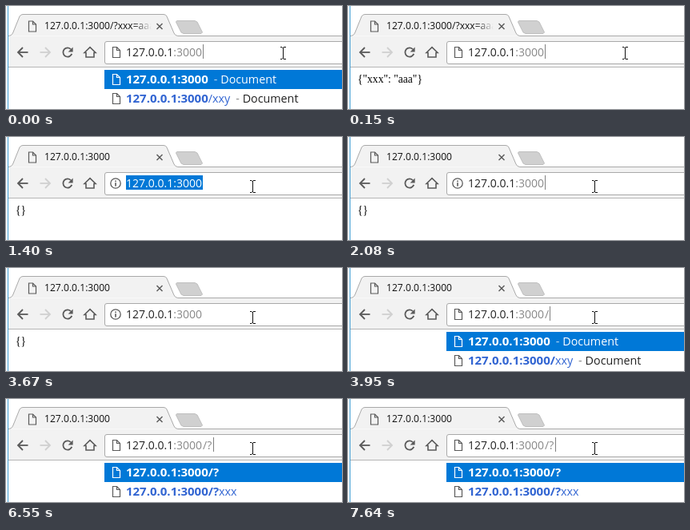
These frames come from a looping animation (420x129 px, 8 s). An HTML page with a canvas:

```html
<!DOCTYPE html>
<html lang="en">
<head>
<meta charset="utf-8">
<title>Address bar</title>
<style>
html, body { margin: 0; width: 100%; height: 100%; overflow: hidden; background: #fff; }
canvas { display: block; }
</style>
</head>
<body>
<canvas id="stage" width="420" height="129"></canvas>
<script>
const ctx = document.getElementById('stage').getContext('2d');
const LOOP = 8000;
const HOST = '127.0.0.1';
const SITE = HOST + ':3000';
const BLUE = '#0078d7';
const LINK = '#3265d2';
const UI = '"Open Sans", "Noto Sans", sans-serif';
const URL_FONT = '14px ' + UI;
const LABEL_FONT = '14.3px ' + UI;
const BOLD_FONT = 'bold 15px ' + UI;

// Moments at which the caret changes between shown and hidden.
const caretFlips = [0, 270, 2080, 2670, 3240, 3670, 3950, 4530, 4940, 5560, 5990, 7110, 7640];

function rect(x, y, w, h, color) {
  ctx.fillStyle = color;
  ctx.fillRect(x, y, w, h);
}

// Draws text and returns the x where it ends.
function text(str, x, y, font, color) {
  ctx.font = font;
  ctx.fillStyle = color;
  ctx.fillText(str, x, y);
  return x + ctx.measureText(str).width;
}

function path(points, close) {
  ctx.beginPath();
  points.forEach(([x, y]) => ctx.lineTo(x, y));
  if (close) ctx.closePath();
}

function line(points, color, width = 1, close = false) {
  path(points, close);
  ctx.strokeStyle = color;
  ctx.lineWidth = width;
  ctx.stroke();
}

function pageIcon(cx, cy, color) {
  const l = cx - 4.5, r = cx + 4.5, t = cy - 6.5, b = cy + 6.5;
  line([[l, t], [r - 4, t], [r, t + 4], [r, b], [l, b]], color, 1.2, true);
  line([[r - 4, t], [r - 4, t + 4], [r, t + 4]], color, 1.2);
}

function infoIcon(cx, cy) {
  ctx.beginPath();
  ctx.arc(cx, cy, 6.2, 0, Math.PI * 2);
  ctx.strokeStyle = '#5a5a5a';
  ctx.lineWidth = 1.3;
  ctx.stroke();
  rect(cx - 0.8, cy - 3.5, 1.6, 1.6, '#5a5a5a');
  rect(cx - 0.8, cy - 0.8, 1.6, 4.4, '#5a5a5a');
}

function arrow(cx, cy, dir, color) {
  line([[cx - 6.5 * dir, cy], [cx + 5.5 * dir, cy]], color, 1.8);
  line([[cx, cy - 6], [cx + 6 * dir, cy], [cx, cy + 6]], color, 1.8);
}

function reloadIcon(cx, cy) {
  ctx.beginPath();
  ctx.arc(cx, cy, 5.6, 0.35, Math.PI * 1.75);
  ctx.strokeStyle = '#5a5a5a';
  ctx.lineWidth = 1.8;
  ctx.stroke();
  path([[cx + 6.6, cy - 6.6], [cx + 6.6, cy - 0.6], [cx + 0.6, cy - 0.6]], true);
  ctx.fillStyle = '#5a5a5a';
  ctx.fill();
}

function homeIcon(cx, cy) {
  line([[cx - 7, cy + 0.5], [cx, cy - 6.4], [cx + 7, cy + 0.5], [cx + 5, cy + 0.5], [cx + 5, cy + 6],
    [cx - 5, cy + 6], [cx - 5, cy + 0.5]], '#5a5a5a', 1.6, true);
}

function pointer(x, y) {
  const top = y - 7.5, end = y + 7.5;
  line([[x - 3, top], [x - 1, top], [x, top + 1], [x + 1, top], [x + 4, top]], '#111');
  line([[x - 3, end], [x - 1, end], [x, end - 1], [x + 1, end], [x + 4, end]], '#111');
  rect(x, top + 0.5, 1, 14, '#111');
}

function drawTab(title) {
  ctx.beginPath();
  ctx.moveTo(3, 37.5);
  ctx.quadraticCurveTo(7, 37.5, 8.5, 34);
  ctx.lineTo(17, 13);
  ctx.quadraticCurveTo(18.5, 10.5, 21, 10.5);
  ctx.lineTo(197, 10.5);
  ctx.quadraticCurveTo(200, 10.5, 201, 13);
  ctx.lineTo(210, 34);
  ctx.quadraticCurveTo(211.5, 37.5, 215, 37.5);
  ctx.fillStyle = '#f2f2f2';
  ctx.fill();
  ctx.strokeStyle = '#a9a9a9';
  ctx.lineWidth = 1;
  ctx.stroke();
  line([[215, 37.5], [420, 37.5]], '#a9a9a9');

  path([[213.5, 18.5], [236, 18.5], [239, 20], [245.5, 33], [244, 34.5], [222, 34.5], [219, 33], [212.5, 20]], true);
  ctx.fillStyle = '#d0d0d0';
  ctx.fill();
  ctx.strokeStyle = '#bebebe';
  ctx.stroke();

  pageIcon(33, 25.5, '#5a5a5a');
  const fade = ctx.createLinearGradient(160, 0, 182, 0);
  fade.addColorStop(0, '#111');
  fade.addColorStop(1, 'rgba(17,17,17,0)');
  text(title, 48, 29, '12.1px ' + UI, fade);
  line([[188.5, 22], [195.5, 29]], '#5a5a5a', 1.5);
  line([[195.5, 22], [188.5, 29]], '#5a5a5a', 1.5);
}

function drawToolbar() {
  rect(3, 38, 417, 38, '#f2f2f2');
  rect(3, 76, 417, 1, '#b6b6b6');
  arrow(21, 58, -1, '#5a5a5a');
  arrow(49, 58, 1, '#d0d0d0');
  reloadIcon(77, 58);
  homeIcon(105, 58);
  ctx.beginPath();
  ctx.roundRect(123.5, 44.5, 310, 28, 2.5);
  ctx.fillStyle = '#fff';
  ctx.fill();
  ctx.strokeStyle = '#a9a9a9';
  ctx.lineWidth = 1;
  ctx.stroke();
}

function drawAddress(s) {
  if (s.info) infoIcon(137, 58);
  else pageIcon(138, 58, '#5a5a5a');
  if (s.selected) rect(150, 48, 96, 18, BLUE);
  const end = text(HOST, 150, 63, URL_FONT, s.selected ? '#fff' : '#222');
  text(':3000', end, 63, URL_FONT, s.selected ? '#fff' : '#888');
  text(s.typed, 246, 63, URL_FONT, '#888');
  if (s.caret) rect([246, 252, 259][s.typed.length], 48, 1, 18, '#808080');
}

function suggestion(baseline, match, rest, title, active) {
  const main = active ? '#fff' : LINK;
  pageIcon(138, baseline - 5, active ? '#fff' : '#5a5a5a');
  let x = text(match, 150, baseline, BOLD_FONT, main);
  x = text(rest, x, baseline, LABEL_FONT, main);
  if (!title) return;
  text('-', x + 7, baseline, LABEL_FONT, active ? '#b8d8f2' : '#888');
  text(title, x + 15.5, baseline, LABEL_FONT, active ? '#fff' : '#222');
}

function drawSuggestions(typed) {
  const query = typed === '/?';
  rect(123, 80, 297, 24, BLUE);
  suggestion(97, query ? SITE + '/?' : SITE, '', query ? '' : 'Document', true);
  suggestion(121, SITE + typed, query ? 'xxx' : typed ? 'xxy' : '/xxy', query ? '' : 'Document', false);
}

function stateAt(t) {
  const flips = caretFlips.filter(time => time <= t).length;
  return {
    title: t < 270 ? SITE + '/?xxx=aaa' : SITE,
    typed: t < 3950 ? '' : t < 6550 ? '/' : '/?',
    open: t < 150 || t >= 3950,
    body: t < 390 ? '{"xxx": "aaa"}' : '{}',
    info: t >= 510 && t < 3950,
    selected: t >= 1400 && t < 2080,
    caret: flips % 2 === 1,
    pointer: t < 1160 ? [346, 59] : t < 1280 ? [325, 61] : [308, 62]
  };
}

function draw(t) {
  const s = stateAt(t);
  rect(0, 0, 420, 129, '#fff');
  drawTab(s.title);
  drawToolbar();
  drawAddress(s);
  if (s.open) drawSuggestions(s.typed);
  else text(s.body, 12, 96, '13.6px "Liberation Serif", serif', '#000');
  rect(2, 0, 1, 129, '#3a9bd3');
  pointer(...s.pointer);
}

function tick() {
  draw(performance.now() % LOOP);
  requestAnimationFrame(tick);
}
tick();
</script>
</body>
</html>
```
